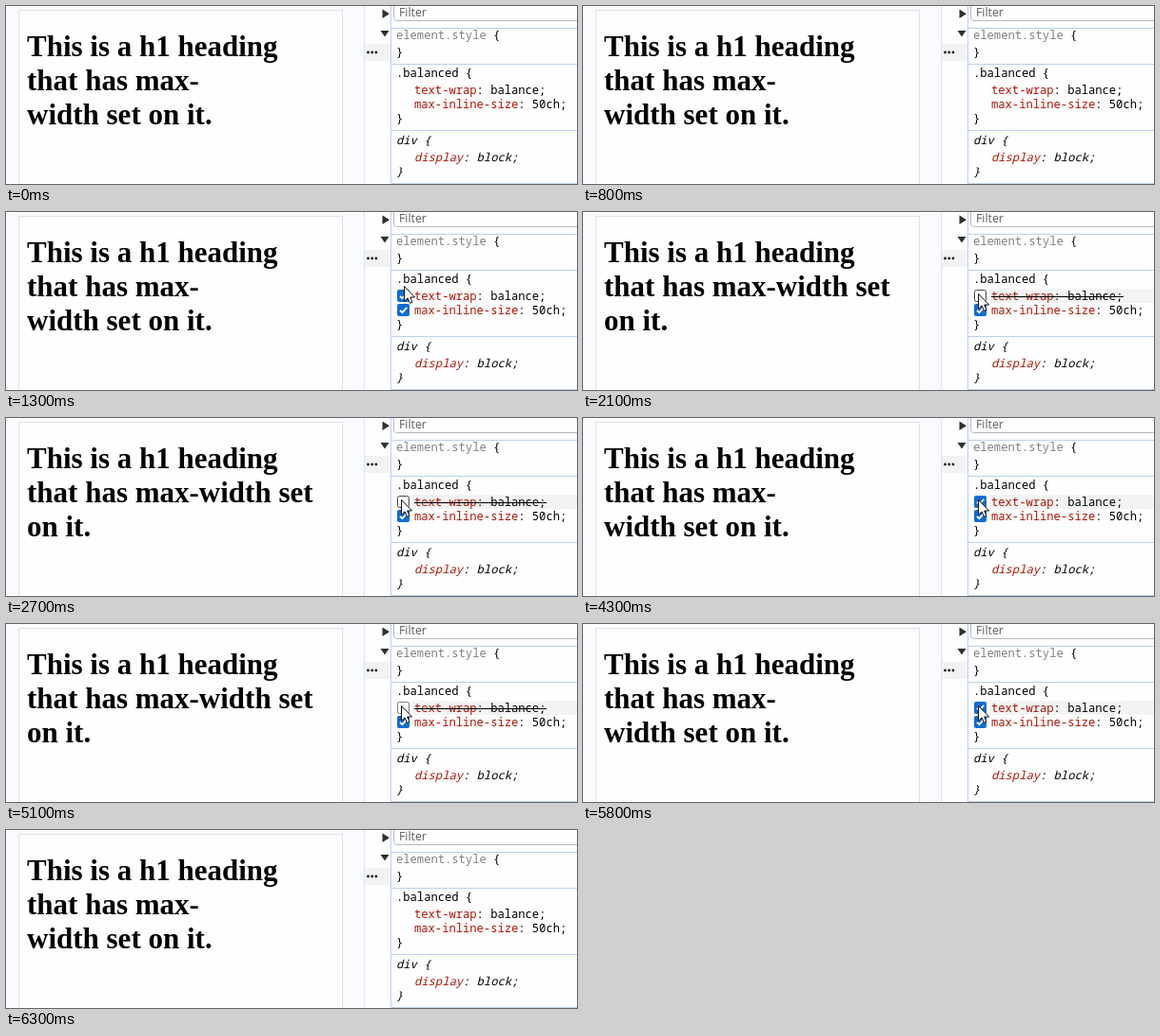
Recreate the animation shown at these times as an HTML page. Size 600 by 188 pixels, loop 7.1 s.

```html
<!DOCTYPE html>
<html lang="en">
<head>
<meta charset="utf-8">
<title>Balanced heading</title>
<style>
  html, body { margin: 0; width: 100%; height: 100%; overflow: hidden; background: #fff; }
  svg { display: block; width: 600px; height: 188px; }
  .heading { font: bold 31px "Liberation Serif", "Times New Roman", serif; fill: #000; }
  .code { font: 12.15px "Noto Sans Mono", "DejaVu Sans Mono", monospace; fill: #000; }
  .ua { font-style: italic; }
  .prop { fill: #b01508; }
  .muted { fill: #808080; }
  .filter { font: 12.3px "Open Sans", sans-serif; fill: #5a5d61; }
  .rule { stroke: #bccff0; }

  .on, .off, .boxes, .row { animation: 7100ms step-end infinite; }
  .on { animation-name: on; }
  .off { animation-name: off; }
  .boxes { animation-name: boxes; }
  .row { animation-name: row; }
  .empty { animation: border 7100ms step-end infinite; }
  .cursor { animation: move 7100ms infinite; }

  @keyframes on {
    0%, 46.47%, 80.28% { visibility: visible; }
    29.57%, 66.19% { visibility: hidden; }
  }
  @keyframes off {
    0%, 46.47%, 80.28% { visibility: hidden; }
    29.57%, 66.19% { visibility: visible; }
  }
  @keyframes boxes {
    0%, 84.5% { opacity: 0; }
    15.49% { opacity: 1; }
  }
  @keyframes row {
    0%, 83.09% { opacity: 0; }
    19.71% { opacity: 1; }
  }
  @keyframes border {
    0% { stroke: #444; }
    66.19% { stroke: #777; }
  }
  @keyframes move {
    0% { transform: translate(440px, 190px); animation-timing-function: step-end; }
    11.26% { transform: translate(440px, 190px); animation-timing-function: steps(5); }
    18.3% { transform: translate(418px, 78px); animation-timing-function: steps(3); }
    22.53% { transform: translate(415px, 86px); animation-timing-function: step-end; }
    81.68% { transform: translate(415px, 86px); animation-timing-function: steps(5); }
    88.72%, 100% { transform: translate(430px, -24px); }
  }
</style>
</head>
<body>
<svg viewBox="0 0 600 188">
  <defs>
    <g id="checked">
      <rect width="13" height="13" rx="2" fill="#0f6cd6"/>
      <path d="M3 6.8 5.4 9.2 10.2 3.8" fill="none" stroke="#fff" stroke-width="1.8"/>
    </g>
  </defs>

  <!-- page preview -->
  <rect width="376" height="188" fill="#fafbfe"/>
  <rect x="13.5" y="4.5" width="340" height="190" fill="#fefefe" stroke="#e0e1e4"/>
  <g class="heading">
    <text x="22" y="53">This is a h1 heading</text>
    <g class="on">
      <text x="22" y="89">that has max-</text>
      <text x="22" y="124.5">width set on it.</text>
    </g>
    <g class="off">
      <text x="22" y="89">that has max-width set</text>
      <text x="22" y="124.5">on it.</text>
    </g>
  </g>

  <!-- styles panel -->
  <rect x="376" width="224" height="188" fill="#fefefe"/>
  <rect x="377" y="40" width="27" height="18" fill="#f1f2f4"/>
  <path d="M376.5 0V188" stroke="#dae4f6"/>
  <path class="rule" d="M404.5 0V188M404 23.5H600M404 61.5H600M404 131.5H600M404 187.5H600"/>
  <path d="M395.5 3.5 403 8.2 395.5 13ZM393.5 26H402.5L398 32.5Z" fill="#303030"/>
  <g fill="#222">
    <circle cx="380.5" cy="49" r="1.4"/>
    <circle cx="384.7" cy="49" r="1.4"/>
    <circle cx="388.9" cy="49" r="1.4"/>
  </g>
  <rect x="407.5" y="-6.5" width="210" height="22" rx="3" fill="#fefefe" stroke="#b4b8c0"/>
  <text class="filter" x="413" y="11">Filter</text>

  <rect class="row" x="427" y="81" width="173" height="15" fill="#f3f3f3"/>
  <g class="code">
    <text x="410" y="35"><tspan class="muted">element.style</tspan> {</text>
    <text x="410" y="53">}</text>
    <text x="410" y="75">.balanced {</text>
    <text x="429" y="93"><tspan class="prop">text-wrap</tspan>: balance;</text>
    <text x="429" y="108"><tspan class="prop">max-inline-size</tspan>: 50ch;</text>
    <text x="410" y="123">}</text>
    <g class="ua">
      <text x="410" y="146">div {</text>
      <text x="429" y="164"><tspan class="prop">display</tspan>: block;</text>
      <text x="410" y="179">}</text>
    </g>
  </g>
  <path class="off" d="M429 89.5H568" stroke="#000"/>

  <g class="boxes">
    <use class="on" href="#checked" x="411" y="82"/>
    <g class="off">
      <rect class="empty" x="411.5" y="82.5" width="12" height="12" rx="2" fill="#fff"/>
    </g>
    <use href="#checked" x="411" y="97"/>
  </g>

  <path class="cursor" d="M.5.5V16.2L4.1 12.9 6.5 18.4 9 17.3 6.7 12H11.6Z" fill="#fff" stroke="#111"/>
</svg>
</body>
</html>
```
